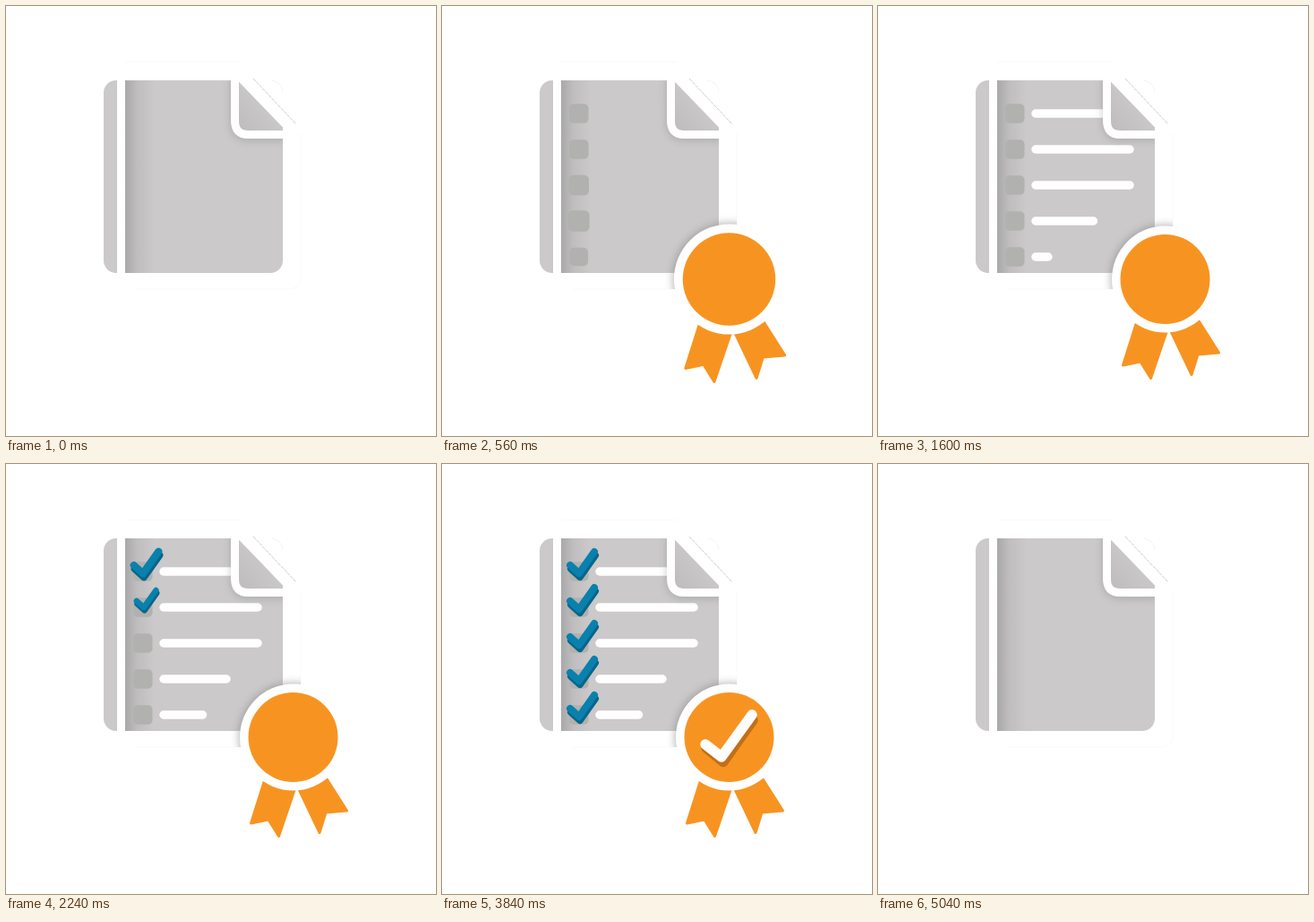
These frames come from a looping animation (480 by 480 pixels, 5280 ms). An HTML page:

```html
<!DOCTYPE html>
<html lang="en">
<head>
<meta charset="utf-8">
<title>Checklist certificate</title>
<style>
  html, body { margin: 0; width: 100%; height: 100%; overflow: hidden; background: #fff; }
  svg { display: block; width: 100%; height: 100%; }
  .stroke { fill: none; stroke-linecap: round; stroke-linejoin: round; }
</style>
</head>
<body>
<svg viewBox="0 0 480 480">
  <defs>
    <linearGradient id="spine">
      <stop offset="0" stop-color="#a9a8a8"/>
      <stop offset=".4" stop-color="#bfbdbe"/>
      <stop offset="1" stop-color="#cbc9ca"/>
    </linearGradient>
    <linearGradient id="flap" x1="0" y1="1" x2=".6" y2=".4">
      <stop offset="0" stop-color="#bcbabb"/>
      <stop offset="1" stop-color="#cbc9ca"/>
    </linearGradient>
    <filter id="blur" x="-30%" y="-30%" width="160%" height="160%"><feGaussianBlur stdDeviation="4"/></filter>
    <clipPath id="paper"><path d="M133 62H262L329 139V302Q329 316 315 316H133Z"/></clipPath>
    <clipPath id="page"><rect x="109" y="83" width="200" height="215" rx="14"/></clipPath>
    <g id="tick" class="stroke" stroke-width="8">
      <path d="M144 117L154 126L171 102" stroke="#08658a"/>
      <path d="M143 113L153 122L170 98" stroke="#0981ac"/>
    </g>
  </defs>

  <path d="M133 62.5H262M329 142V302Q329 316 315 316H145" fill="none" stroke="#fafafa"/>
  <g clip-path="url(#page)">
    <path d="M109 83H309V298H109Z" fill="#cbc9ca"/>
    <path d="M133 83h33v215h-33z" fill="url(#spine)"/>
    <path d="M124 83h9v215h-9z" fill="#fff"/>
  </g>
  <g id="squares" fill="#b1b1af"></g>
  <g id="lines" class="stroke" stroke="#fff" stroke-width="9.5"></g>
  <g clip-path="url(#page)">
    <path d="M255 80V129Q255 146 270 146H312" fill="none" stroke="#777" stroke-width="9" opacity=".35" filter="url(#blur)"/>
    <path d="M255 76L314 137V83Z" fill="#fff"/>
    <path d="M255 76V128Q255 143.500 270 143.500H312V136Z" fill="url(#flap)"/>
    <path d="M255.500 76V128Q255.500 143.500 270 143.500H312M255 73L312 132" fill="none" stroke="#fff" stroke-width="9"/>
  </g>
  <path d="M276 81L324 132" stroke="#aaa" stroke-width=".6" stroke-dasharray="4 1"/>
  <g id="ticks"></g>

  <g clip-path="url(#paper)">
    <g id="shadow"><circle cx="320.5" cy="305" r="61" fill="#777" opacity=".5" filter="url(#blur)"/></g>
  </g>
  <g id="badge">
    <path d="M289 352L273.500 401L293 397L304.500 415.500L323 361ZM326 361L350 411.500L357 389L380.500 387L357 350Z"
      fill="#f79421" stroke="#f79421" stroke-width="3" stroke-linejoin="round"/>
    <circle cx="320.5" cy="305" r="59.500" fill="#fff"/>
    <circle cx="320.5" cy="305" r="50" fill="#f79421"/>
    <g id="seal" class="stroke" stroke-width="11.500">
      <path d="M295 317L314 332.500L347 286" stroke="#c36f19"/>
      <path d="M294 313L312 327L346 280" stroke="#fff"/>
    </g>
  </g>
</svg>
<script>
const LOOP = 5280, STEP = 80, LAST = 5040;
// Scale values spaced one step apart
const POP = [0, .22, .95, 1.1, 1.04, 1];
const TICK = [0, .3, .8, 1.02, 1.03, 1.02, 1];
const GROW = [0, .06, .22, .52, .82, .98, 1.03, 1.035, 1.015, 1];
const VANISH = [1, 1.05, .8, .33, .05, 0];
const DROP = [1, 1.06, .75, .25, 0];
const LINE_ENDS = [264, 281, 281, 246, 219.5];

const $ = id => document.getElementById(id);
const clamp = x => Math.min(1, Math.max(0, x));

function sample(keys, age) {
  const p = clamp(age / STEP / (keys.length - 1)) * (keys.length - 1);
  const i = Math.min(Math.floor(p), keys.length - 2);
  return keys[i] + (keys[i + 1] - keys[i]) * (p - i);
}

function ease(p, power) {
  const half = x => (2 * x) ** power / 2;
  return p < .5 ? half(p) : 1 - half(1 - p);
}

function scaleAbout(el, x, y, s, dy = 0) {
  el.setAttribute('transform', `translate(${x} ${y + dy}) scale(${s}) translate(${-x} ${-y})`);
}

function add(parent, tag, attrs) {
  const el = document.createElementNS('http://www.w3.org/2000/svg', tag);
  for (const name in attrs) el.setAttribute(name, attrs[name]);
  return $(parent).appendChild(el);
}

const rows = LINE_ENDS.map((end, i) => ({
  end,
  y: 120 + 40 * i,
  square: add('squares', 'rect', { x: 142, y: 109.25 + 40 * i, width: 21.5, height: 21.5, rx: 5 }),
  line: add('lines', 'path', {}),
  tick: add('ticks', 'use', { href: '#tick' })
}));

function draw(t) {
  rows.forEach(({ end, y, square, line, tick }, i) => {
    const lead = STEP * i;
    scaleAbout(square, 152.75, y, sample(POP, t - 80 - lead) * sample(VANISH, t - 4640 + lead));

    const grown = clamp((t - 800 - 2 * lead) / 400);
    const gone = clamp((t - 4400 + lead) / 440);
    const length = (end - 176) * ease(grown, 2) * (1 - ease(gone, 4));
    line.setAttribute('d', grown > 0 && gone < 1 ? `M176 ${y}h${length + .01}` : '');

    const size = sample(TICK, t - 1840 - 3 * lead) * sample(VANISH, t - 4320 + lead);
    scaleAbout(tick, 157, 113, size, 40 * i);
  });
  const badgeSize = sample(GROW, t) * sample(DROP, t - 4720);
  scaleAbout($('badge'), 320.5, 305, badgeSize);
  scaleAbout($('shadow'), 320.5, 305, badgeSize);
  scaleAbout($('seal'), 320.5, 306, sample(TICK, t - 3040));
}

function tick() {
  const t = performance.now() % LOOP;
  draw(Math.min(LAST, Math.floor(t / STEP) * STEP));
  requestAnimationFrame(tick);
}
tick();
</script>
</body>
</html>
```
